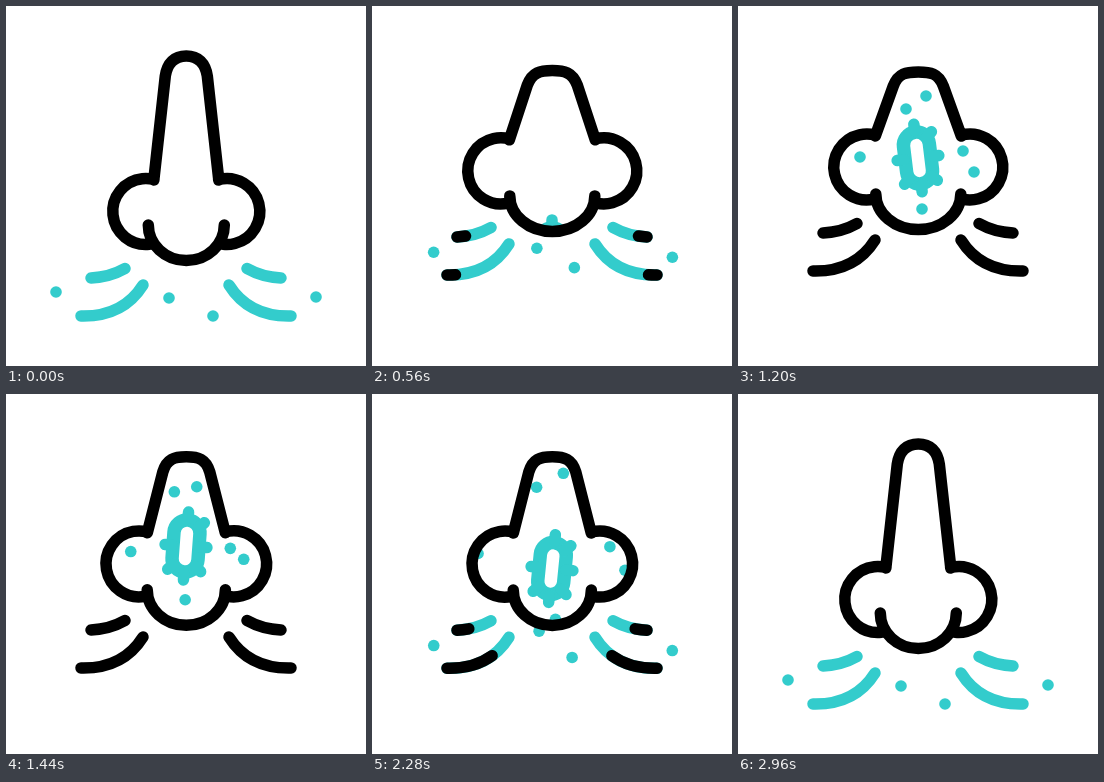
Write an HTML page with a canvas that moves like this. It is 360 by 360 pixels and loops after 3 s.

```html
<!DOCTYPE html>
<html lang="en">
<head>
<meta charset="utf-8">
<title>Breathing nose</title>
<style>
  html, body { margin: 0; width: 100%; height: 100%; overflow: hidden; background: #fff; }
  canvas { display: block; width: 360px; height: 360px; }
</style>
</head>
<body>
<canvas id="stage"></canvas>
<script>
const LOOP = 3000, STEP = 40, INK = '#000', TEAL = '#33cccc', STROKE = 11.5;
const canvas = document.getElementById('stage');
const ctx = canvas.getContext('2d');
const ratio = window.devicePixelRatio || 1;
canvas.width = canvas.height = 360 * ratio;

const mix = (a, b, u) => a + (b - a) * u;
const smooth = u => u * u * (3 - 2 * u);
const span = (t, a, b) => Math.min(1, Math.max(0, (t - a) / (b - a)));

// Eases 0 to 1 over a..b and back to 0 over c..d.
const pulse = (t, a, b, c, d) => smooth(span(t, a, b)) - smooth(span(t, c, d));

// x, y, then travel toward the nose and lag on the way out
const OUTER = [
  { x: 50, y: 286, dx: 75, dy: -65, dip: 22, lag: 0 },
  { x: 163, y: 292, dx: 12, dy: -56, dip: -56, lag: 90 },
  { x: 207, y: 310, dx: -30, dy: -47, dip: -47, lag: 40 },
  { x: 310, y: 291, dx: -62, dy: -65, dip: 22, lag: 0 }
];

// Middle of each floating dot's sway, and half its reach
const INNER = [
  { x: 192, y: 94, dx: -4, dy: -4 },
  { x: 168.5, y: 95.5, dx: -.5, dy: 7.5 },
  { x: 126, y: 160.5, dx: -4, dy: -9.5 },
  { x: 224, y: 158.5, dx: 1, dy: -13.5 },
  { x: 238.5, y: 165, dx: -2.5, dy: 1 },
  { x: 177, y: 207, dx: 7, dy: -4 }
];

function dot(x, y) {
  ctx.fillStyle = TEAL;
  ctx.beginPath();
  ctx.arc(x, y, 5.8, 0, 7);
  ctx.fill();
}

function strokePath(path, color, width = STROKE) {
  ctx.strokeStyle = color;
  ctx.lineWidth = width;
  ctx.stroke(path);
}

function nosePaths(lift, flare) {
  const mid = 180.3, swell = mix(lift, flare, .3);
  const footX = mix(32.5, 43, flare), footY = mix(174, 130, lift);
  const wingX = mix(40.5, 51.5, flare), wingY = mix(205.5, 161, lift);
  const endX = mix(37, 44, flare), endY = mix(238.5, 194, lift);
  const tipX = mix(38, 42.5, flare ** 3), tipY = mix(219, 188, swell);
  const topY = mix(50, 66, lift), sideX = mix(21, 25, flare), sideY = mix(70, 80, lift);
  const curveX = mix(19, 20, flare), curveY = mix(57, 67, lift);
  const from = Math.atan2(footY - wingY, wingX - footX);
  const to = Math.atan2(endY - wingY, wingX - endX);

  function bridge(p) {
    p.lineTo(mid - footX, footY);
    p.lineTo(mid - sideX, sideY);
    p.bezierCurveTo(mid - curveX, curveY, mid - 12, topY, mid, topY);
    p.bezierCurveTo(mid + 12, topY, mid + curveX, curveY, mid + sideX, sideY);
    p.lineTo(mid + footX, footY);
  }
  const rightWing = p => p.arc(mid + wingX, wingY, 33, Math.PI - from, Math.PI - to);
  const leftWing = p => p.arc(mid - wingX, wingY, 33, to, from);
  const tip = p => p.ellipse(mid, tipY, tipX, 35.5, 0, 0, Math.PI);

  const top = new Path2D(), bottom = new Path2D(), inside = new Path2D();
  leftWing(top); bridge(top); rightWing(top);
  tip(bottom);
  bridge(inside); rightWing(inside); tip(inside); leftWing(inside);
  inside.closePath();
  return { inside, top, bottom };
}

// Air lines: black runs in from the outer ends, then back out.
function streams(t, y) {
  const long = new Path2D('M75 310Q117 311 137 279');
  const short = new Path2D('M85 272Q104 271 119 262.5');
  const filled = 73 * span(t, 530, 790), cleared = 73 * span(t, 2190, 2450);
  for (const side of [1, -1]) {
    ctx.save();
    ctx.translate(side > 0 ? 0 : 360, y);
    ctx.scale(side, 1);
    for (const [path, len] of [[long, 73], [short, 37]]) {
      const black = Math.min(len, filled) - Math.min(len, cleared);
      if (black < len) strokePath(path, TEAL);
      if (black > 0) {
        ctx.setLineDash([black, 200]);
        strokePath(path, INK);
        ctx.setLineDash([]);
      }
    }
    ctx.restore();
  }
}

function outerDots(t, y) {
  for (const d of OUTER) {
    const s = t < LOOP / 2 ? span(t, 430, 760) ** 2 : (1 - span(t - d.lag, 1990, 2470)) ** 2;
    if (s < 1) dot(d.x + d.dx * s, d.y + y + d.dip * s + (d.dy - d.dip) * s * s);
  }
}

function germ(t) {
  const sway = -7 * Math.cos((t - 1200) / 675 * 2 * Math.PI) * span(t, 560, 900);
  ctx.save();
  ctx.translate(180, 300 - 148 * pulse(t, 400, 800, 2190, 2555));
  ctx.rotate(sway * Math.PI / 180);
  const body = new Path2D(), spikes = new Path2D();
  body.roundRect(-13, -26, 26, 52, 13);
  for (const s of [-1, 1]) {
    for (const [x, y] of [[0, 34], [21, 0], [16.5 * s, 24.5]]) {
      spikes.moveTo(x * s * .65, y * s * .8);
      spikes.lineTo(x * s, y * s);
    }
    spikes.moveTo(-11 * s, 19 * s);
    spikes.lineTo(-16.5 * s, 24.5 * s);
  }
  strokePath(body, TEAL, 13.5);
  strokePath(spikes, TEAL);
  ctx.restore();
}

function innerDots(t) {
  const swing = Math.cos((t - 1200) / 600 * Math.PI);
  const spread = 1 + 1.8 * ((1 - span(t, 640, 1080)) ** 3 + span(t, 2040, 2480) ** 3);
  for (const d of INNER) {
    dot(180 + (d.x + d.dx * swing - 180) * spread, 130 + (d.y + d.dy * swing - 130) * spread);
  }
}

function draw(t) {
  ctx.setTransform(ratio, 0, 0, ratio, 0, 0);
  ctx.fillStyle = '#fff';
  ctx.fillRect(0, 0, 360, 360);
  ctx.lineCap = ctx.lineJoin = 'round';

  const relax = smooth(span(t, 1200, 1440));
  const lift = pulse(t, 200, 640, 2260, 2700) * (1 - .2 * relax);
  const flare = pulse(t, 180, 560, 2260, 2700) * (1 - .38 * relax);
  const nose = nosePaths(lift, flare);
  streams(t, -45 * lift);
  outerDots(t, -45 * lift);

  ctx.fillStyle = '#fff';
  ctx.fill(nose.inside);
  ctx.save();
  ctx.clip(nose.inside);
  germ(t);
  innerDots(t);
  ctx.restore();
  strokePath(nose.top, INK);
  strokePath(nose.bottom, INK);
}

const start = performance.now();
function tick() {
  const t = (performance.now() - start) % LOOP;
  draw(Math.floor(t / STEP) * STEP);
  requestAnimationFrame(tick);
}
tick();
</script>
</body>
</html>
```
